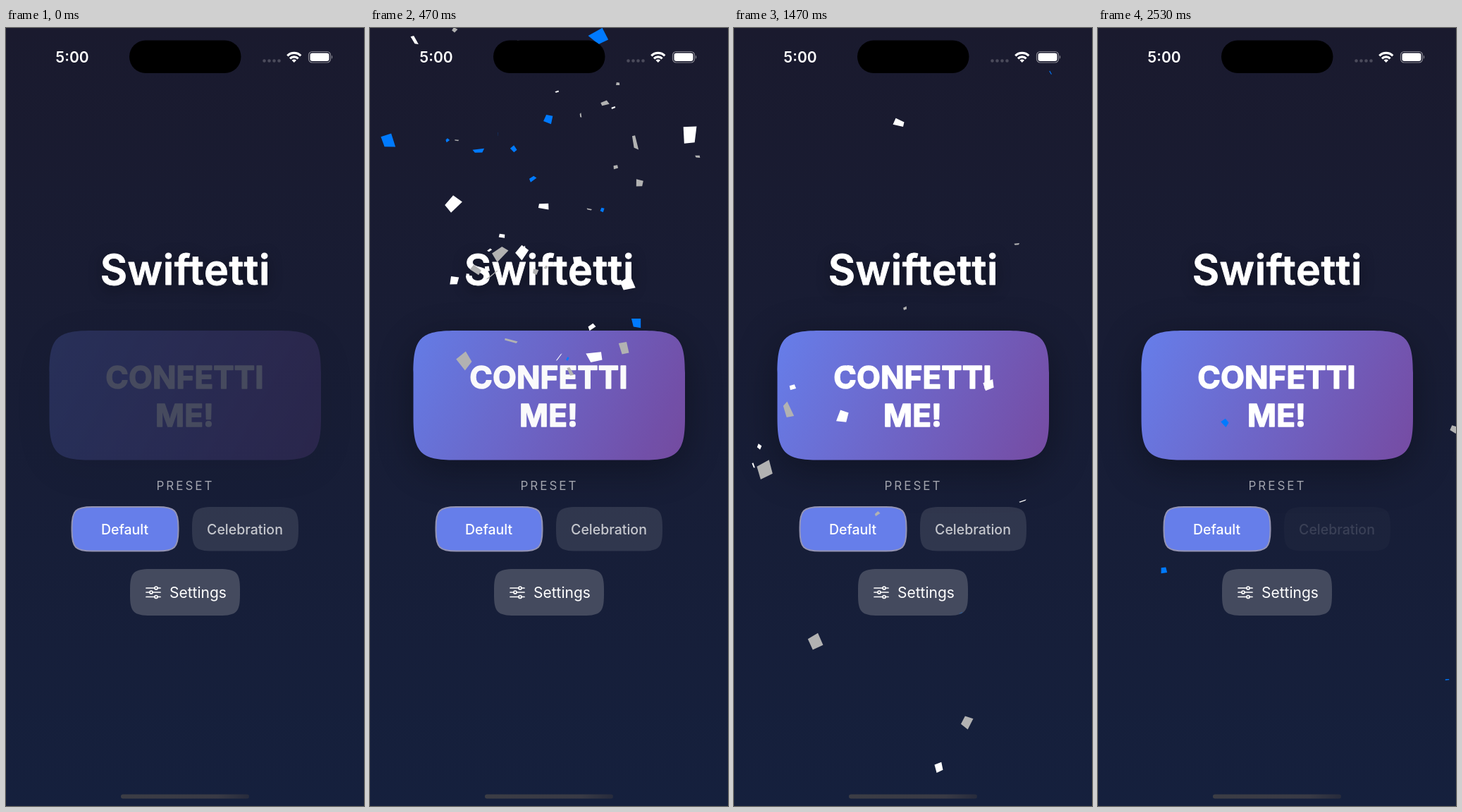
An HTML page with a canvas that plays this animation: 508 by 1103 pixels, repeating every 2.6 s.

```html
<!DOCTYPE html>
<html lang="en">
<head>
<meta charset="utf-8">
<title>Confetti demo</title>
<style>
  html, body { margin: 0; width: 100%; height: 100%; overflow: hidden; background: #171c36; }
  svg, canvas { position: absolute; left: 0; top: 0; width: 508px; height: 1103px; }
  text { font-family: Inter, "Open Sans", sans-serif; fill: #fff; text-anchor: middle; }
  .round { stroke: #fff; stroke-linejoin: round; }
  .title { font-size: 59px; font-weight: 600; letter-spacing: .6px; stroke-width: .9; filter: drop-shadow(0 5px 10px #0006); }
  .big { font-size: 44px; font-weight: 700; letter-spacing: .1px; stroke-width: 1.5; }
  .label { font-size: 17px; letter-spacing: 3px; opacity: .6; }
  .chip { font-size: 19.5px; font-weight: 500; }
  #main path { filter: drop-shadow(0 13px 28px #0005); }
</style>
</head>
<body>
<svg viewBox="0 0 508 1103">
  <defs>
    <linearGradient id="sky" x2="0" y2="1"><stop stop-color="#1a1a2e"/><stop offset="1" stop-color="#15203d"/></linearGradient>
    <linearGradient id="violet" gradientUnits="userSpaceOnUse" x1="61" y1="429" x2="447" y2="612"><stop stop-color="#667eea"/><stop offset="1" stop-color="#764ba2"/></linearGradient>
  </defs>
  <rect width="508" height="1103" fill="url(#sky)"/>
  <text class="title round" x="254.300" y="364">Swiftetti</text>
  <g id="main">
    <path data-box="61.5 429 385.5 183.5 39" fill="url(#violet)"/>
    <text class="big round" x="253.500" y="510.500">CONFETTI</text>
    <text class="big round" x="253.500" y="564.500">ME!</text>
  </g>
  <text class="label" x="254.500" y="655">PRESET</text>
  <path data-box="93.5 679 151 62.5 19" fill="#667eea" stroke="#9494b4" stroke-width="2"/>
  <text class="chip" x="168.500" y="717.500">Default</text>
  <g id="other">
    <path data-box="264 679 151 62.5 19" fill="#fff" opacity=".11"/>
    <text class="chip" x="339" y="717.500" opacity=".72">Celebration</text>
  </g>
  <path data-box="176 767 156 66 19" fill="#444a5e"/>
  <g fill="#444a5e" stroke="#fff" stroke-width="1.700" stroke-linecap="round">
    <path d="M199 794h20M199 800h20M199 806.500h20"/>
    <circle cx="213" cy="794" r="2"/><circle cx="206" cy="800" r="2"/><circle cx="213" cy="806.500" r="2"/>
  </g>
  <text x="272.500" y="808" font-size="21">Settings</text>
</svg>
<canvas id="stage" width="508" height="1103"></canvas>
<svg viewBox="0 0 508 1103">
  <defs>
    <linearGradient id="bar"><stop stop-color="#3c3d45"/><stop offset=".75" stop-color="#393a45"/><stop offset="1" stop-color="#272b3c"/></linearGradient>
  </defs>
  <rect x="175" y="17.500" width="158.500" height="46.500" rx="23.200"/>
  <text x="94" y="49" font-size="21" font-weight="600">5:00</text>
  <path d="M366.500 46.500h22" stroke="#4b4b5b" stroke-width="4.600" stroke-linecap="round" stroke-dasharray="0 7"/>
  <path d="M399.300 39.300a13.500 13.500 0 0 1 19 0M403 43.300a8.200 8.200 0 0 1 11.600 0" fill="none" stroke="#fff" stroke-width="3.200"/>
  <path d="M408.800 49l-3.200-3.300a4.600 4.600 0 0 1 6.400 0z" fill="#fff"/>
  <rect x="429.500" y="33.500" width="31" height="15.500" rx="5" fill="none" stroke="#85858f" stroke-width="1.200"/>
  <rect x="431.500" y="35.500" width="27" height="11.500" rx="3.200" fill="#fff"/>
  <path d="M462 38.500q2.500 2.700 0 5.400z" fill="#85858f"/>
  <rect x="163" y="1086.500" width="182" height="6" rx="3" fill="url(#bar)"/>
</svg>
<script>
const LOOP = 2600, STEP = 200 / 3, BURST = 0.13;
const ctx = document.getElementById('stage').getContext('2d');
const mainButton = document.getElementById('main');
const otherButton = document.getElementById('other');

// Boxes with continuous corners
for (const path of document.querySelectorAll('[data-box]')) {
  const [x, y, w, h, r] = path.dataset.box.split(' ').map(Number);
  const e = 1.528 * r, c = 0.27 * r, k = e - c;
  path.setAttribute('d', `M${x + e} ${y}h${w - 2 * e}c${k} 0 ${e} ${c} ${e} ${e}
    v${h - 2 * e}c0 ${k} ${-c} ${e} ${-e} ${e}
    h${2 * e - w}c${-k} 0 ${-e} ${-c} ${-e} ${-e}
    v${2 * e - h}c0 ${-k} ${c} ${-e} ${e} ${-e}z`);
}

let seed = 48271;
const rand = (lo = 0, hi = 1) => {
  seed = (seed * 16807) % 2147483647;
  return lo + (hi - lo) * seed / 2147483647;
};

const colors = ['#ffffff', '#b2b2b2', '#007aff', '#b2b2b2', '#ffffff'];

// Half of the pieces shoot off the screen, the others rise and fall back
function makePiece(i) {
  const fast = i % 2;
  const side = (i * 0.618 % 1) * 2 - 1;
  return {
    color: colors[i % 5],
    vx: side * (fast ? 1450 : 480),
    vy: fast ? 500 * Math.abs(side) - rand(1350, 2750) : rand(-1500, -300),
    g: fast ? 500 : rand(750, 1450),
    size: 5 + 20 * rand() ** 1.5,
    turn: rand(0, 6.28), spin: rand(-4, 4),
    tilt: rand(0, 6.28), flip: rand(-5, 5),
    corners: [[-1, -1], [1, -1], [1, 1], [-1, 1]]
      .map(([x, y]) => [x * rand(0.28, 0.62), y * rand(0.32, 0.62)])
  };
}
const pieces = Array.from({ length: 80 }, (_, i) => makePiece(i));

function drawPiece(p, t) {
  const x = 254 + p.vx * (1 - Math.exp(-t));
  const y = 540 + p.vy * t + p.g * t * t / 2;
  ctx.save();
  ctx.translate(x, y);
  ctx.rotate(p.turn + p.spin * t);
  ctx.scale(p.size, p.size * Math.cos(p.tilt + p.flip * t));
  ctx.beginPath();
  p.corners.forEach(c => ctx.lineTo(...c));
  ctx.fillStyle = p.color;
  ctx.fill();
  ctx.restore();
}

function draw(ms) {
  const t = Math.floor((ms % LOOP + 5) / STEP) * STEP / 1000;
  const age = t - BURST;
  const fade = Math.min(1, Math.max(0, age / 0.4));
  mainButton.style.opacity = 1 - 0.8 * (1 - fade) ** 2;
  otherButton.style.opacity = t > 2.5 ? 0.2 : 1;
  ctx.clearRect(0, 0, 508, 1103);
  if (age > 0.01) pieces.forEach(p => drawPiece(p, age));
}

const start = performance.now();
function tick() {
  draw(performance.now() - start);
  requestAnimationFrame(tick);
}
tick();
</script>
</body>
</html>
```
